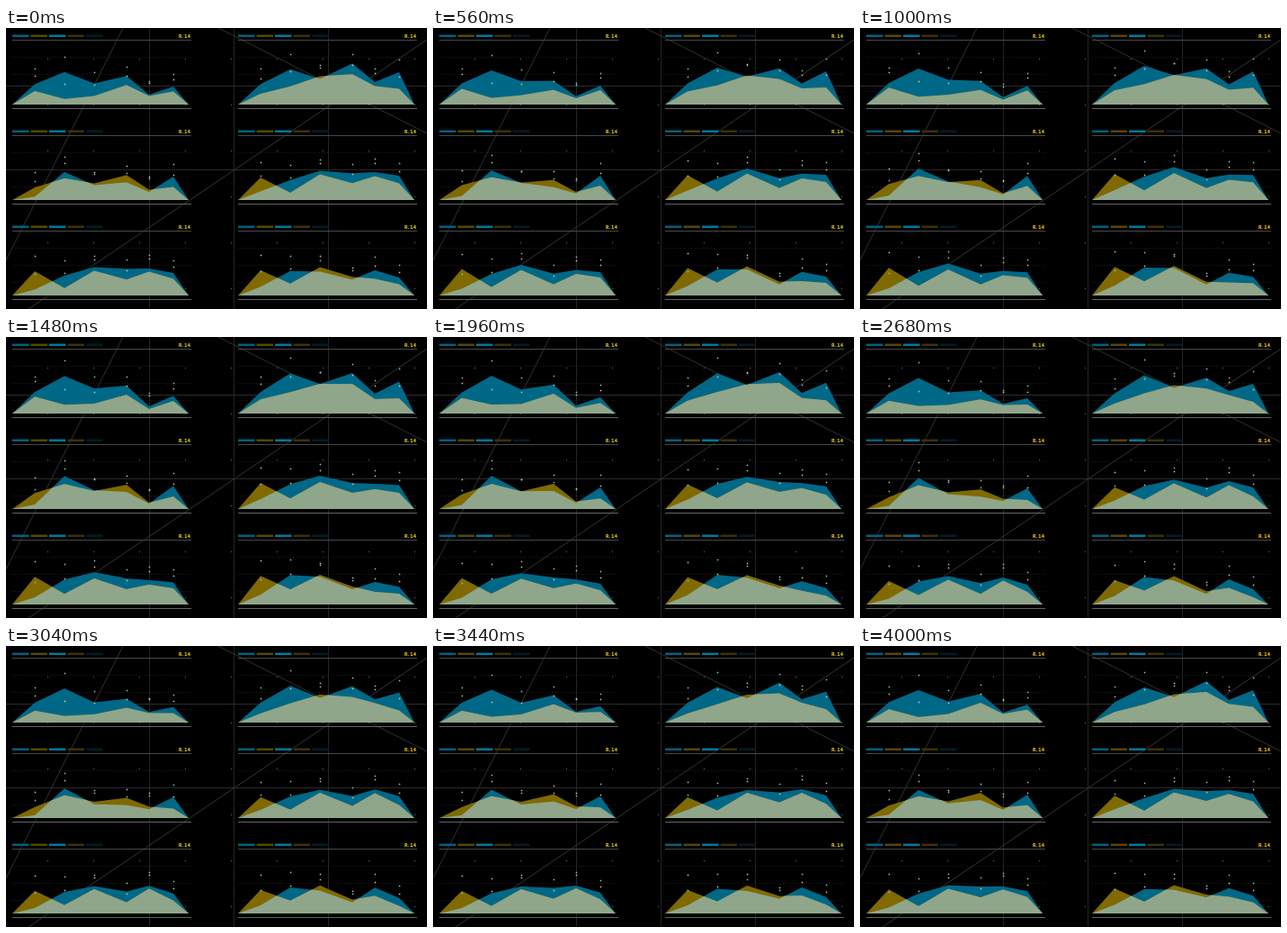
A matplotlib script for the animation above (4.04 s loop, 468 by 312 pixels).

```python
import numpy as np
import matplotlib.pyplot as plt
from matplotlib.animation import FuncAnimation
from matplotlib.patches import Rectangle

W, H, DPI = 468, 312, 100
FRAMES, STEP = 101, 40
COLUMN, ROW = 251, 106
BLUE, GOLD, SAGE = "#006887", "#806a00", "#8fa68a"

XS = np.array([7, 32, 65, 98, 134, 159, 186, 203])
FINE = np.linspace(XS[0], XS[-1], 785)
LIFT = np.array([17, 17, 13, 10, 15, 14])

# Mean heights of the inner vertices: blue, gold
PANELS = [
    ([23, 39, 25, 29, 10, 19], [16, 8, 10, 19, 8, 13]),
    ([23, 42, 30, 43, 24, 35], [13, 22, 32, 31, 19, 16]),
    ([4, 34, 18, 17, 8, 25], [15, 26, 19, 25, 10, 13]),
    ([10, 25, 34, 27, 30, 26], [26, 10, 29, 16, 25, 17]),
    ([7, 25, 33, 27, 29, 24], [28, 10, 28, 15, 25, 17]),
    ([10, 30, 28, 15, 27, 19], [29, 15, 32, 18, 17, 11]),
]

# Every vertex dips on a cosine: cycles per loop, phase and depth
CYCLES = np.array([1, 1, 1, 2, 1, 1])
PHASE = np.radians([290, 340, 300, 140, 120, 240])
DEPTH = {BLUE: np.array([1, 3, 3, 3.5, 2, 2]),
         GOLD: np.array([3, 2, 1, 3.5, 3, 3])}


def heights(mean, color, u):
    dip = DEPTH[color] * np.cos(2 * np.pi * CYCLES * u - PHASE)
    return np.maximum(np.array(mean) - dip, 0.5)


fig = plt.figure(figsize=(W / DPI, H / DPI), dpi=DPI, facecolor="black")
ax = fig.add_axes([0, 0, 1, 1])
ax.set_xlim(0, W)
ax.set_ylim(H, 0)
ax.axis("off")


def line(x, y, color, z=1, width=1.0, **kw):
    ax.plot(x, y, color=color, lw=width * 72 / DPI, zorder=z,
            snap=False, solid_capstyle="butt", **kw)


def dots(x, y, color, size, z):
    return ax.plot(x, y, "s", color=color, ms=size * 72 / DPI, mew=0,
                   zorder=z, snap=False)[0]


def backdrop():
    for x in (159.5, 253.5, 358.5):
        line([x, x], [0, H], "#242424")
    for y in (64.5, 157.5):
        line([0, W], [y, y], "#2c2c2c")
    for x, y in (([130, 0], [0, 258]), ([236, W], [0, 117]), ([W, 25], [13, H])):
        line(x, y, "#363636", width=0.8)
    gx, gy = np.meshgrid(np.arange(45, W, 51), np.arange(33, H, 51))
    dots(gx.ravel() + 0.5, gy.ravel() + 0.5, "#565c5e", 1.2, 1)


def frame_panel(left, base):
    right = left + 199
    shades = ["#006080", "#574700", "#00789c", "#3c3200", "#001c28"]
    for i, shade in enumerate(shades):
        ax.add_patch(Rectangle((left + 20.5 * i, base - 77.5), 18.5, 2.5,
                               fc=shade, lw=0, zorder=2, snap=False))
    ax.text(right, base - 73.8, "R.14", color="#f0d214", fontsize=4.2,
            family="DejaVu Sans Mono", weight="bold",
            ha="right", va="baseline", zorder=3)
    line([left, right], [base - 71.5] * 2, "#484848", 2)
    line([left, right], [base + 4.5] * 2, "#626262", 2)
    for up in (52.5, 33.5, 14.5):
        line([left, right], [base - up] * 2, "#2a2422", 2, 0.8,
             dashes=(1.5, 2.5))


class Chart:
    def __init__(self, dx, base, blue, gold):
        self.dx, self.base = dx, base
        self.series = [(blue, BLUE), (gold, GOLD)]
        self.fills = [ax.fill([0], [0], color=c, lw=0, zorder=3 + i)[0]
                      for i, c in enumerate((BLUE, GOLD, SAGE))]
        self.marks = [dots([], [], c, 1.5, 7) for c in ("#8cc8c4", "#d4cc98")]

    def update(self, u):
        curves = []
        for (mean, color), mark in zip(self.series, self.marks):
            h = heights(mean, color, u)
            curves.append(np.interp(FINE, XS, np.r_[0, h, 0]))
            mark.set_data(XS[1:-1] + self.dx, self.base - h - LIFT)
        curves.append(np.minimum(*curves))
        for fill, curve in zip(self.fills, curves):
            fill.set_xy(np.column_stack([FINE + self.dx, self.base - curve]))
        return self.fills + self.marks


backdrop()
charts = []
for i, (blue, gold) in enumerate(PANELS):
    dx, base = i % 2 * COLUMN, 85 + i // 2 * ROW
    frame_panel(7 + dx, base)
    charts.append(Chart(dx, base, blue, gold))


def draw(n):
    return [a for c in charts for a in c.update(n / FRAMES)]


anim = FuncAnimation(fig, draw, frames=FRAMES, interval=STEP,
                     repeat=True, repeat_delay=0, blit=False)
plt.show()
```
